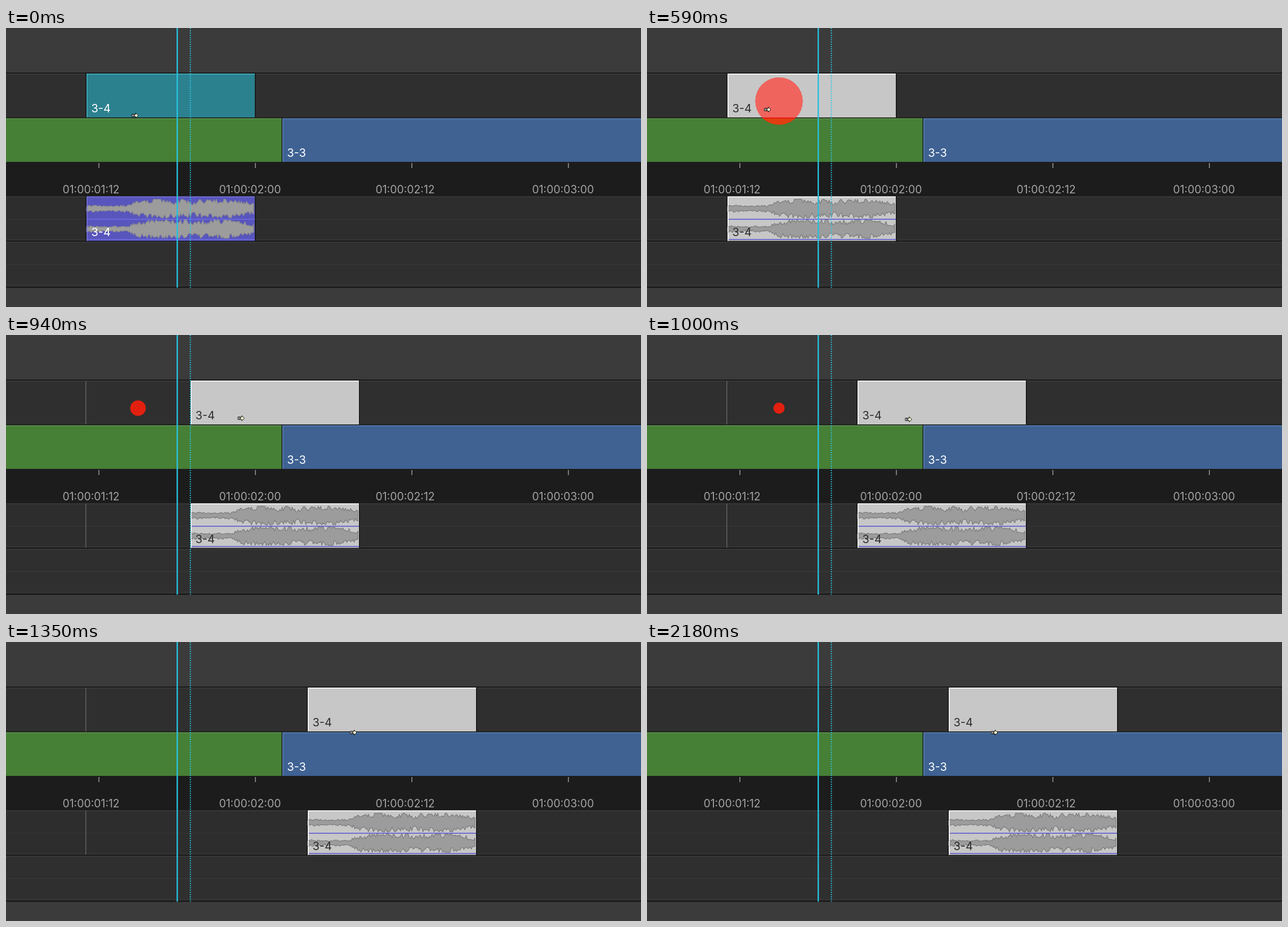
Animation of 1128x496 px, one loop 3940 ms. Source, as an HTML page:

```html
<!DOCTYPE html>
<html lang="en">
<head>
<meta charset="utf-8">
<title>Timeline clip drag</title>
<style>
  html, body { margin: 0; width: 100%; height: 100%; overflow: hidden; background: #3b3b3b; }
  svg { display: block; width: 100vw; height: 100vh; }
  text { font-family: Inter, Roboto, sans-serif; font-size: 20px; }
  .time { font-size: 19.4px; fill: #a4a4a4; }
</style>
</head>
<body>
<svg viewBox="0 0 1128 496">
  <defs>
    <clipPath id="inClip"><rect id="inRect" y="81" width="299" height="78"/></clipPath>
    <clipPath id="inGreen"><rect y="161" width="490" height="77"/></clipPath>
  </defs>
  <g id="lanes"></g>
  <path id="ghost" d="M141.8 82V159M141.8 300V378" stroke="#616161" stroke-width="1.5"/>
  <g id="clip">
    <path d="M-1.5 81H300.5V159H-1.5ZM-1.5 299H300.5V379H-1.5Z" fill="#141414"/>
    <rect id="video" y="81" width="299" height="78"/>
    <rect id="audio" y="299.5" width="299" height="79"/>
    <path id="wave" fill="#9c9c9c" stroke-width="1.2" stroke-linejoin="round"/>
    <path id="rules" d="M2 340H299M2 376H299" stroke-width="1.5"/>
    <path id="videoRim" d="M.75 159V81.75H299" fill="none" stroke-width="1.5"/>
    <path id="audioRim" d="M.75 378.5V300.25H299" fill="none" stroke-width="1.5"/>
  </g>
  <circle class="dot" cx="234.5" cy="130" fill="#e3200f"/>
  <circle class="dot" cx="234.5" cy="130" fill="#e23e12" clip-path="url(#inGreen)"/>
  <circle class="dot" cx="234.5" cy="130" fill="#f0645e" clip-path="url(#inClip)"/>
  <g id="names">
    <text x="8.5" y="150">3-4</text>
    <text x="8.5" y="370">3-4</text>
  </g>
  <path d="M304.2 0V461.5" stroke="#27c0de" stroke-width="2.4"/>
  <path d="M327.5 0V461.5" stroke="#2cc6e4" stroke-width="1.8" stroke-dasharray="2 2"/>
  <g id="cursor" stroke="#000" stroke-width=".95" stroke-linejoin="round">
    <path d="M-5.5 -2.2H-1.3V2.2H-5.5ZM-3.4 -2.2V2.2" fill="#fff"/>
    <path d="M-.9 -2.1H1.4V-4.5L6 0L1.4 4.5V2.1H-.9Z" fill="#ffffd2"/>
  </g>
</svg>
<script>
const LOOP = 3940;
const PRESS = 590, REST = 1350, DROP = 2120;
const TICK = (REST - PRESS) / 13; // length of one screen update
const HOME = 142.6, GRAB = 220;
const SECOND = 556, FRAME = SECOND / 24;

// pointer poses: time, x, y
const POSES = [
  [0, 229, 155.5], [120, 214, 145], [PRESS, 214, 145], [820, 330, 145],
  [1000, 465, 150], [1120, 570, 155.5], [REST, 617, 161]
];

const $ = id => document.getElementById(id);
const attr = (id, name, value) => $(id).setAttribute(name, value);
const box = (x, y, w, h, fill) => `<rect x="${x}" y="${y}" width="${w}" height="${h}" fill="${fill}"/>`;
const bar = (y, h, fill) => box(0, y, 1128, h, fill);
const smooth = v => { const u = Math.min(1, Math.max(0, v)); return u * u * (3 - 2 * u); };

function timecode(frames) {
  const pad = n => String(n).padStart(2, '0');
  return `01:00:${pad(Math.floor(frames / 24))}:${pad(frames % 24)}`;
}

function drawLanes() {
  const track = (y, h) => bar(y - 1.2, 1.8, '#141414') + bar(y + .6, 1.2, '#424242') + bar(y + 1.8, h, '#2f2f2f');
  let out = bar(0, 496, '#3b3b3b') + track(80.5, 77);
  out += bar(159, 79, '#141414');
  out += box(0, 161, 489.6, 77, '#467f36') + box(0, 160.5, 489.6, 1.4, '#68a058');
  out += box(491, 161, 637, 77, '#3f6293') + box(491, 160.5, 637, 1.4, '#6188bd') + box(491, 161, 1.4, 77, '#6188bd');
  out += '<text x="499.2" y="229" fill="#fff">3-3</text>';
  out += bar(238, 61.5, '#1c1c1c');
  for (let i = 0; i < 4; i++) {
    const x = 164.3 + i * SECOND / 2;
    out += box(x, 240, 1.4, 9, '#a2a2a2');
    out += `<text class="time" x="${x - 63.8}" y="294">${timecode(36 + 12 * i)}</text>`;
  }
  out += bar(299.5, 1.2, '#3f3f3f') + bar(300.7, 78.3, '#2d2d2d') + track(379.7, 78.5);
  for (const y of [339.3, 375.5, 420, 456.5]) out += bar(y, 1.2, '#383838');
  out += bar(460, 1.8, '#141414');
  $('lanes').innerHTML = out;
}

// quiet lead-in, a loud body with a dip, then a fade
function loudness(x) {
  const body = 5.3 + 11.5 * smooth((x - 72) / 26);
  const dip = 1 - 0.4 * Math.exp(-(((x - 190) / 8) ** 2));
  return body * dip * (1 - 0.5 * smooth((x - 262) / 36)) * (1 + 0.1 * Math.sin(x / 9));
}

function wavePath(mid, seed) {
  const rand = () => (seed = (seed * 16807) % 2147483647) / 2147483647;
  const top = [], low = [];
  for (let x = 0; x < 299; x += 2.2) {
    const reach = () => Math.min(16.6, loudness(x) * (0.5 + 0.6 * rand()));
    top.push(`${x.toFixed(1)} ${(mid - reach()).toFixed(1)}`);
    low.unshift(`${x.toFixed(1)} ${(mid + reach()).toFixed(1)}`);
  }
  return 'M' + top.concat(low).join('L') + 'Z';
}

// smooth curve through the poses; axis 1 is x, 2 is y
function pointer(t, axis) {
  const last = POSES.length - 1;
  const slope = i => i === 0 || i === last ? 0 :
    (POSES[i + 1][axis] - POSES[i - 1][axis]) / (POSES[i + 1][0] - POSES[i - 1][0]);
  let i = 0;
  while (i < last - 1 && t >= POSES[i + 1][0]) i++;
  const a = POSES[i], b = POSES[i + 1], span = b[0] - a[0];
  const u = (t - a[0]) / span, s = smooth(u);
  return a[axis] * (1 - s) + b[axis] * s +
    span * u * (1 - u) * ((1 - u) * slope(i) - u * slope(i + 1));
}

// the screen is refreshed only while something moves
function held(t) {
  if (t < PRESS) return Math.min(120, Math.floor(t / 60) * 60);
  return PRESS + TICK * Math.min(13, Math.floor((t - PRESS + 5) / TICK));
}

function paint(selected) {
  const pick = (on, off) => selected ? on : off;
  attr('video', 'fill', pick('#c7c7c7', '#2c818f'));
  attr('audio', 'fill', pick('#c7c7c7', '#5855bd'));
  attr('videoRim', 'stroke', pick('#fff', '#45b3c2'));
  attr('audioRim', 'stroke', pick('#fff', '#7976dc'));
  attr('rules', 'stroke', pick('#5754d2', '#716ee2'));
  attr('names', 'fill', pick('#2d2d2d', '#fff'));
  attr('wave', 'stroke', pick('#7b7b7b', '#85858f'));
}

function render(t) {
  const now = held(t), pressed = t >= PRESS;
  const px = pointer(now, 1), py = pointer(now, 2);
  const moved = pressed ? Math.max(0, Math.floor((px - GRAB) / FRAME)) : 0;
  const x = Math.round(HOME + moved * FRAME);
  const radius = pressed ? 42 * Math.max(0, 1 - (now - PRESS) / 620) ** 1.33 : 0;
  paint(pressed);
  attr('clip', 'transform', `translate(${x})`);
  attr('names', 'transform', `translate(${x})`);
  attr('inRect', 'x', x);
  attr('ghost', 'visibility', moved && t < DROP ? 'visible' : 'hidden');
  attr('cursor', 'transform', `translate(${px} ${py})`);
  document.querySelectorAll('.dot').forEach(dot => dot.setAttribute('r', radius));
}

drawLanes();
attr('wave', 'd', wavePath(321, 4711) + wavePath(357.3, 9203));

const began = performance.now();
function tick() {
  render((performance.now() - began) % LOOP);
  requestAnimationFrame(tick);
}
tick();
</script>
</body>
</html>
```
